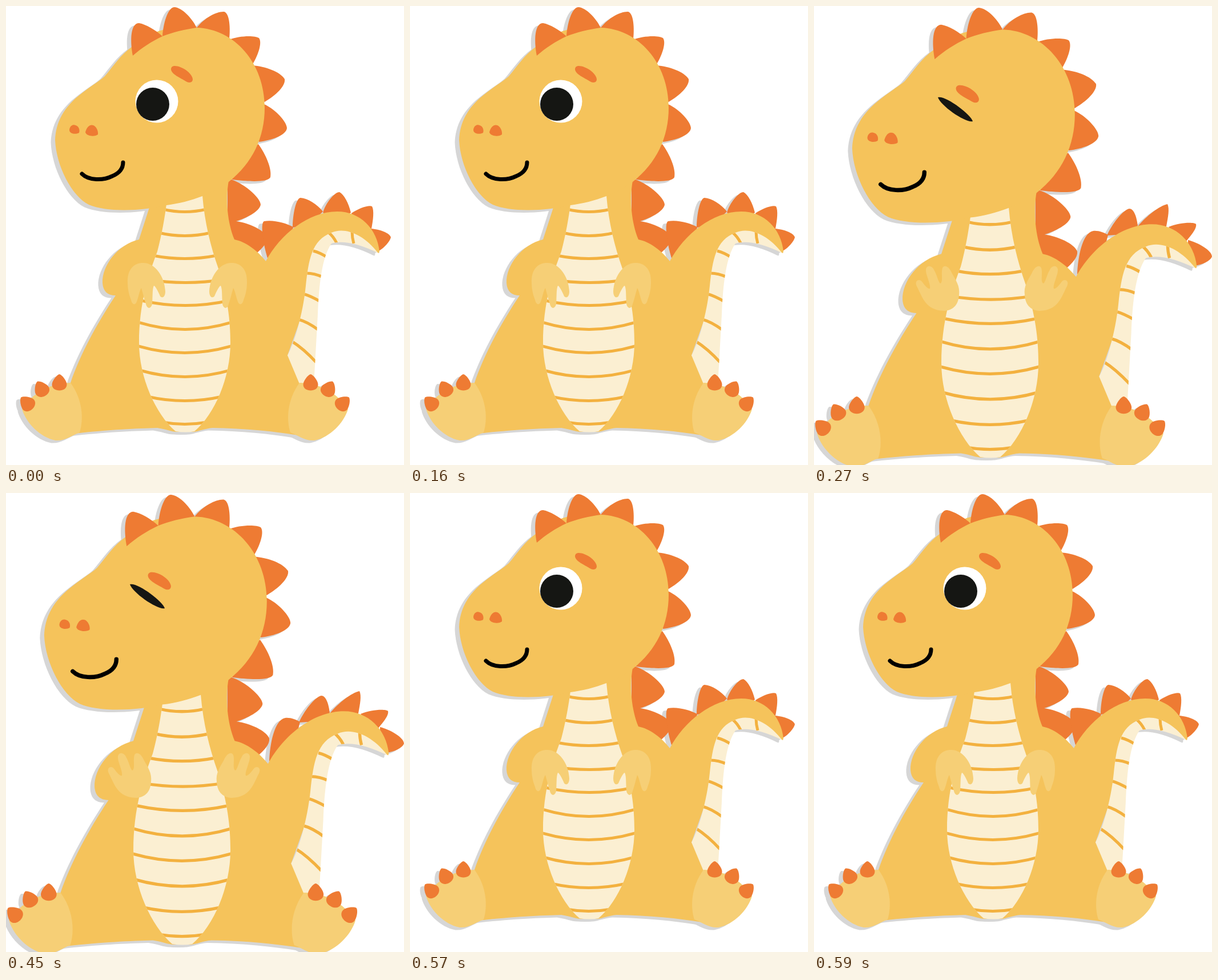
Recreate the animation shown at these times as an HTML page with a canvas. Size 697 px wide and 804 px high, loop 0.6 s.

```html
<!DOCTYPE html>
<html lang="en">
<head>
<meta charset="utf-8">
<title>Blinking dinosaur</title>
<style>
  html, body { margin: 0; width: 100%; height: 100%; overflow: hidden; background: #fff; }
  canvas { display: block; width: 697px; height: 804px; }
</style>
</head>
<body>
<canvas id="stage" width="697" height="804"></canvas>
<script>
const ctx = document.getElementById('stage').getContext('2d');

const LOOP = 600, SHUT_FROM = 270, SHUT_TO = 570;
const ORANGE = '#ee7b33', SKIN = '#f5c35b', PALE = '#f6cf76';
const CREAM = '#fbefd2', STRIPE = '#f3b13f', INK = '#151613', SHADE = '#d6d6d6';

const shape = d => new Path2D(d);

const backSpikes = shape(
  'M334 38C348 20 370 9 382 10C392 13 393 40 391 58L370 70Z' +
  'M390 59C408 52 435 51 443 56C449 64 442 85 432 102L400 100Z' +
  'M431 104C455 106 480 115 488 128C490 140 472 157 453 168L430 150Z' +
  'M452 172C472 181 492 203 492 214C490 227 465 235 443 238L430 200Z' +
  'M442 242C455 260 466 285 463 300C458 310 420 307 396 304L400 260Z' +
  'M388 302C415 308 446 336 446 348C444 360 420 372 403 377' +
  'C425 380 452 392 457 405C458 415 448 425 440 432L405 425L388 380Z');

const crest = shape(
  'M222 87C217 60 218 30 233 30C245 32 262 42 274 53C255 62 238 73 222 87Z' +
  'M274 53C276 25 285 2 295 2C308 3 325 20 334 38C312 41 292 46 274 53Z');

const tailSpikes = shape(
  'M459 444C452 425 444 380 452 377C468 374 490 380 503 387L495 425Z' +
  'M502 388C502 365 508 336 516 336C528 337 545 347 555 360L530 385Z' +
  'M555 362C560 345 575 326 584 326C592 330 600 345 604 362L580 375Z' +
  'M605 363C618 354 636 348 641 351C645 358 643 375 640 390L615 385Z' +
  'M639 390C655 391 672 398 674 405C673 412 662 424 653 429L640 405Z');

// Stage coordinates: the tail spikes swing right while the eye is shut
const tailSpikesSwung = shape(
  'M461 470C462 440 470 397 489 394C498 393 508 397 515 401L505 440Z' +
  'M513 402C522 382 540 358 552 355C560 355 565 368 567 385L545 400Z' +
  'M567 386C583 367 605 350 619 347C623 355 620 370 617 386L595 395Z' +
  'M621 387C640 379 665 378 669 382C671 390 659 403 652 412L635 405Z' +
  'M655 410C672 414 697 428 697 439C694 447 680 453 667 455L655 430Z');

const body = shape(
  'M252 350L233 409C195 418 168 455 169 485C170 500 178 507 192 507' +
  'C160 555 130 610 113 660L120 749C180 742 230 740 265 739C280 741 290 746 300 746' +
  'L328 746C338 745 348 740 362 739C420 740 470 745 512 752L530 660L493 612' +
  'L540 480L555 420L585 402L653 433L654 430C650 390 620 360 580 360' +
  'C530 360 480 400 455 447C440 428 420 413 400 409C388 380 384 340 390 306L340 300Z');

const tailUnder = shape(
  'M652 433C625 398 592 387 570 397C535 410 530 445 525 490C520 540 505 590 493 612' +
  'L514 662L520 680L538 680L541 630L546 540C548 490 553 440 570 416C590 410 620 417 652 433Z');

const tailBands = shape(
  'M564 396Q573 403 579 415M606 395Q606 405 609 416M538 429Q550 432 562 440' +
  'M526 468Q540 468 555 475M520 504Q534 508 551 518M512 549Q528 553 548 568' +
  'M500 587Q521 600 543 624');

const belly = shape(
  'M281 347L344 332C348 380 358 420 372 460C388 510 393 550 393 590C393 650 366 715 330 745' +
  'Q315 748 297 745C262 715 233 650 233 590C233 520 250 470 265 430C273 400 278 370 281 347Z');

// left, right, end height, sag
const bands = [
  [279, 347, 357, 4], [271, 355, 398, 5], [261, 365, 438, 5], [251, 378, 480, 5],
  [241, 387, 517, 8], [236, 391, 555, 12], [233, 393, 596, 12], [238, 389, 639, 11],
  [251, 375, 685, 7], [278, 348, 730, 3]
];

const head = shape(
  'M334 38C400 40 453 100 453 178C453 230 432 275 390 308C374 320 358 328 344 333' +
  'C323 341 303 346 281 349C235 360 175 361 145 348C115 333 88 280 86 235' +
  'C87 205 100 177 135 151C152 138 164 131 173 123C190 103 200 86 221 71' +
  'C236 60 256 46 274 42L300 36Z');

const foot = shape(
  'M113 660C135 690 136 725 129 747C115 752 105 762 87 761C60 756 35 730 28 706' +
  'C48 676 80 660 113 660Z');
const toe = shape('M-13 3C-13 -3 -5 -14 0 -15C5 -14 13 -3 13 3C13 17 -13 17 -13 3Z');
const toes = [[37, 696, -0.8], [62, 671, -0.5], [93.5, 660, 0]];

const handDown = shape(
  'M213 485C212 460 225 450 240 450C262 450 278 475 279 500C279 512 271 513 269 506' +
  'C265 497 261 490 259 490C256 495 257 510 256 522C254 531 247 531 245 522' +
  'C241 510 239 500 237 494C233 500 232 512 228 520C225 524 221 523 219 515' +
  'C215 505 213 495 213 485Z');
const handUp = shape(
  'M228 534C195 533 190 510 180 491C175 481 185 476 190 484C195 491 200 496 203 495' +
  'C205 488 195 470 196 461C198 453 207 455 210 462C215 470 217 482 221 486' +
  'C227 484 222 468 225 459C228 452 237 457 241 467C248 480 256 490 254 506' +
  'C253 522 245 533 228 534Z');

const brow = shape(
  'M289 111C289 104 297 104 305 107C316 111 326 120 327 128C327 135 320 135 315 132' +
  'C306 126 290 120 289 111Z');
const nostrils = shape(
  'M111 217C112 209 118 207 122 209C127 210 130 217 128 222C124 225 111 225 111 217Z' +
  'M139 221C142 210 148 207 153 209C158 211 162 219 161 225C157 229 141 229 139 221Z');
const mouth = shape('M133 294C145 306 170 306 186 298C198 293 205 285 205 274');
const shutLid = shape('M217 160C230 156 275 190 278 202C265 205 222 175 217 160Z');

let tint = null;

function fill(path, color) {
  ctx.fillStyle = tint || color;
  ctx.fill(path);
}

function disc(x, y, r, color) {
  ctx.fillStyle = color;
  ctx.beginPath();
  ctx.arc(x, y, r, 0, Math.PI * 2);
  ctx.fill();
}

function scoped(draw) {
  ctx.save();
  draw();
  ctx.restore();
}

// Draws once as is and once flipped, where x becomes sum - x
function mirrored(sum, draw) {
  draw();
  scoped(() => {
    ctx.transform(-1, 0, 0, 1, sum, 0);
    draw();
  });
}

function zoom() {
  ctx.transform(1.0625, 0, 0, 1.059, -24.5, 1);
}

function drawFoot() {
  fill(foot, PALE);
  for (const [x, y, turn] of toes) {
    scoped(() => {
      ctx.translate(x, y);
      ctx.rotate(turn);
      fill(toe, ORANGE);
    });
  }
}

function drawBands() {
  ctx.strokeStyle = STRIPE;
  ctx.lineWidth = 5;
  scoped(() => {
    ctx.clip(tailUnder);
    ctx.stroke(tailBands);
  });
  scoped(() => {
    ctx.clip(belly);
    ctx.beginPath();
    for (const [l, r, y, sag] of bands) {
      ctx.moveTo(l - 4, y - 1);
      ctx.quadraticCurveTo((l + r) / 2, y + sag * 2, r + 4, y - 1);
    }
    ctx.stroke();
  });
}

function drawFace(shut) {
  fill(nostrils, ORANGE);
  scoped(() => {
    if (shut) ctx.translate(-32, 25);
    fill(brow, ORANGE);
  });
  ctx.strokeStyle = '#000';
  ctx.lineWidth = 7;
  ctx.lineCap = 'round';
  ctx.stroke(mouth);
  if (!shut) {
    disc(264, 167, 37.5, '#fff');
    disc(257, 172, 29, INK);
  }
}

function drawDino(shut) {
  const posed = draw => scoped(() => {
    if (shut) zoom();
    draw();
  });
  posed(() => fill(backSpikes, ORANGE));
  fill(shut ? tailSpikesSwung : tailSpikes, ORANGE);
  posed(() => {
    fill(body, SKIN);
    fill(tailUnder, CREAM);
    fill(belly, CREAM);
    if (!tint) drawBands();
    fill(head, SKIN);
    fill(crest, ORANGE);
    mirrored(627, drawFoot);
    if (!tint) drawFace(shut);
  });
  if (tint) return;
  if (shut) fill(shutLid, INK);
  mirrored(shut ? 623 : 635, () => fill(shut ? handUp : handDown, PALE));
}

function render(ms) {
  const t = ms % LOOP;
  const shut = t >= SHUT_FROM && t < SHUT_TO;
  ctx.fillStyle = '#fff';
  ctx.fillRect(0, 0, 697, 804);
  tint = SHADE;
  scoped(() => {
    ctx.translate(-7.5, 4.5);
    drawDino(shut);
  });
  tint = null;
  drawDino(shut);
}

const start = performance.now();
function tick() {
  render(performance.now() - start);
  requestAnimationFrame(tick);
}
tick();
</script>
</body>
</html>
```
